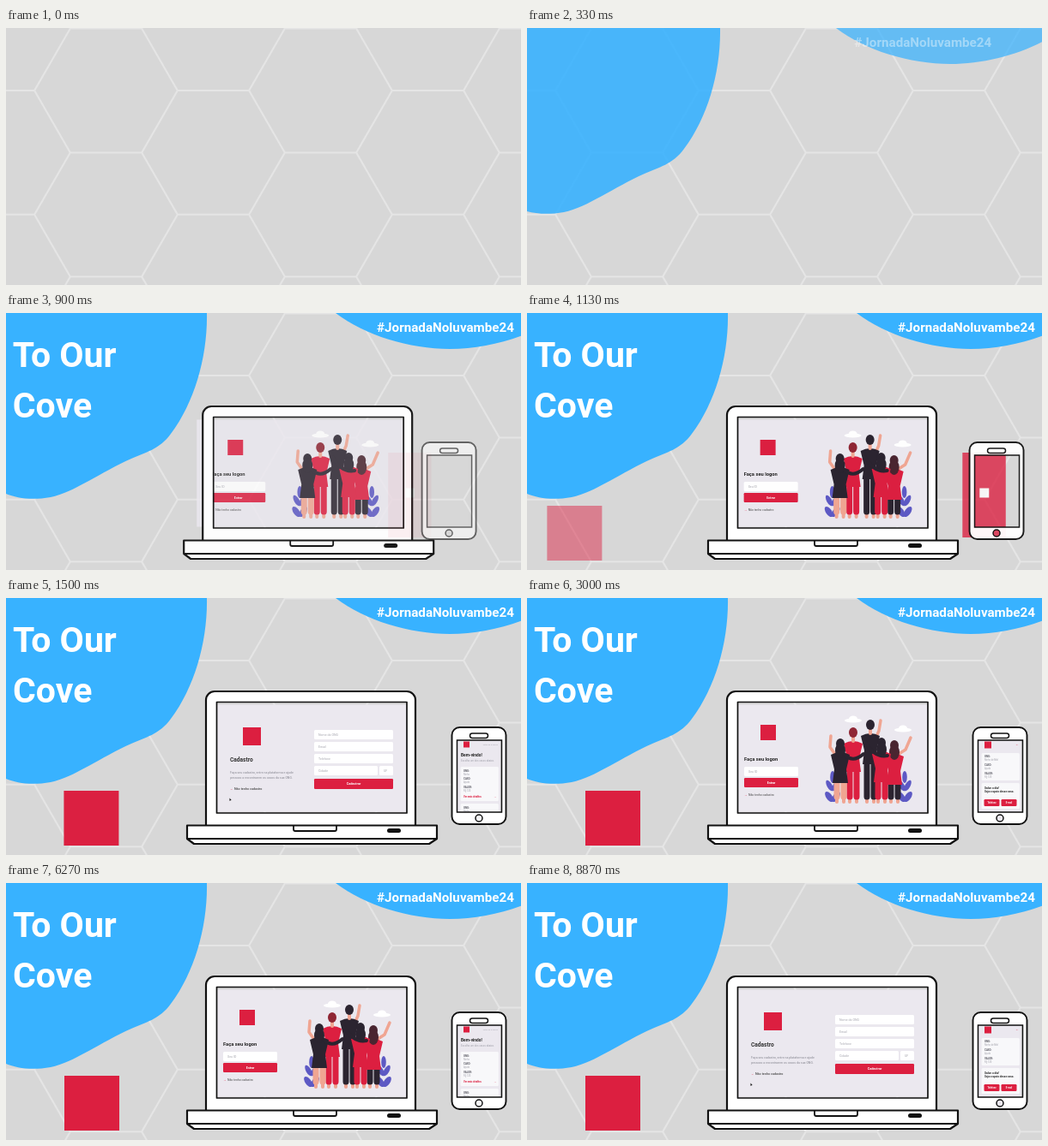
Write an HTML page with a canvas that moves like this. It is 600 by 300 pixels and loops after 9010 ms.

```html
<!DOCTYPE html>
<html lang="pt-BR">
<head>
<meta charset="utf-8">
<title>Apresentação</title>
<style>
html, body { margin: 0; width: 100%; height: 100%; overflow: hidden; background: #d7d7d7; }
canvas { display: block; }
</style>
</head>
<body>
<canvas id="stage" width="600" height="300"></canvas>
<script>
const W = 600, H = 300;
const LOOP = 9010, SLIDE = 600, DISTANCE = 85, PAGE = 1500;
const RED = '#dc1f40', BLUE = '#38b2ff', INK = '#111', DARK = '#2b2430';
const PAPER = '#ebe8ef', SKIN = '#f0a592', LEAF = '#5d59c4';
const stage = document.getElementById('stage').getContext('2d');
const buffer = document.createElement('canvas');
buffer.width = W;
buffer.height = H;
const g = buffer.getContext('2d');

function box(x, y, w, h, fill, r = 0) {
  g.fillStyle = fill;
  g.beginPath();
  g.roundRect(x, y, w, h, r);
  g.fill();
}

function text(str, x, y, size, fill, weight = 400, align = 'left') {
  g.font = `${weight} ${size}px Roboto, sans-serif`;
  g.textAlign = align;
  g.fillStyle = fill;
  g.fillText(str, x, y);
}

function shape(d, fill) {
  g.fillStyle = fill;
  g.fill(new Path2D(d));
}

function line(d, color, width) {
  g.strokeStyle = color;
  g.lineWidth = width;
  g.stroke(new Path2D(d));
}

function oval(x, y, rx, ry, fill, turn = 0) {
  g.fillStyle = fill;
  g.beginPath();
  g.ellipse(x, y, rx, ry, turn, 0, 7);
  g.fill();
}

function rounded(x, y, w, h, r) {
  const path = new Path2D();
  path.roundRect(x, y, w, h, r);
  return path;
}

// A white casing whose openings let the picture behind show through.
function casing(outer, openings, outerWidth, openingWidth) {
  const body = new Path2D(outer);
  body.addPath(openings);
  g.fillStyle = '#fff';
  g.fill(body, 'evenodd');
  g.strokeStyle = INK;
  g.lineWidth = outerWidth;
  g.stroke(outer);
  g.lineWidth = openingWidth;
  g.stroke(openings);
}

const backdrop = new Path2D();
for (let col = -1; col < 5; col++) {
  for (let row = -1; row < 3; row++) {
    const cx = 116.5 + col * 125;
    const cy = 73 + row * 144.8 + (col & 1) * 72.4;
    for (let k = 0; k < 6; k++) {
      const a = k * Math.PI / 3;
      backdrop[k ? 'lineTo' : 'moveTo'](cx + 83.4 * Math.cos(a), cy + 83.6 * Math.sin(a));
    }
    backdrop.closePath();
  }
}

function drawBackdrop() {
  stage.fillStyle = '#d7d7d7';
  stage.fillRect(0, 0, W, H);
  stage.strokeStyle = '#e5e5e5';
  stage.lineWidth = 2;
  stage.stroke(backdrop);
}

function leftBlob() {
  shape('M-120 0H234C235 50 220 104 192 141C179 159 162 163 146 170C110 186 80 209 52 215C30 219 12 216 0 211L-120 180Z', BLUE);
}

function topBlob() {
  shape('M384 0C418 26 470 42 517 42S616 26 650 0Z', BLUE);
}

function hashtag() {
  text('#JornadaNoluvambe24', 432, 22, 15.2, '#fff', 700);
}

function title() {
  text('To Our', 8, 63, 41, '#fff', 700);
  text('Cove', 8, 121.5, 41, '#fff', 700);
}

function emblem() {
  box(68, 225, 64, 64, RED);
}

function laptop() {
  g.lineJoin = 'round';
  casing(rounded(233, 109, 244, 157, [10, 10, 0, 0]), rounded(245.5, 121.5, 221.5, 129.5, 0), 2.2, 1.7);
  const base = 'M211 265.5H502V281L493 287H219L211 281Z';
  shape(base, '#fff');
  line(base + 'M211 281H502', INK, 2.2);
  line('M335 265.5V270Q335 272 337 272H383Q385 272 385 270V265.5', INK, 1.8);
  box(444, 269, 16, 5, INK, 2.5);
}

function phone() {
  const openings = rounded(525.5, 166, 52, 84, 0);
  openings.moveTo(555, 257);
  openings.arc(551, 257, 4, 0, 7);
  casing(rounded(519.5, 151, 63, 113, 9), openings, 1.9, 1.5);
  g.stroke(rounded(540.5, 158, 21, 5.5, 2.7));
}

function field(label, x, y, w) {
  box(x, y, w, 11, '#fff', 1.5);
  text(label, x + 5, y + 7, 3.6, '#a5a5ae');
}

function button(label, x, y, w, h, size) {
  box(x, y, w, h, RED, 1.2);
  text(label, x + w / 2, y + h / 2 + size * 0.36, size, '#fff', 700, 'center');
}

function plant(x, y) {
  for (const side of [-1, 1]) {
    oval(x + side * 4, y - 7, 3.5, 7, LEAF, side * 0.6);
    oval(x + side * 3.5, y - 20, 3, 7, LEAF, side * 0.5);
  }
  oval(x, y - 30, 2.8, 7, LEAF);
}

function person(x, head, top, legs, hair, longHair) {
  const hip = head + 42, foot = 238;
  g.lineCap = 'round';
  line(`M${x - 4} ${hip}V${foot}M${x + 4} ${hip}V${foot}`, SKIN, 4);
  line(`M${x - 4} ${hip}V${foot - 6}M${x + 4} ${hip}V${foot - 6}`, legs, 7);
  shape(`M${x - 11} ${head + 13}Q${x} ${head + 7} ${x + 11} ${head + 13}L${x + 7} ${hip - 12}L${x + 9} ${hip + 4}H${x - 9}L${x - 7} ${hip - 12}Z`, top);
  line(`M${x} ${head + 5}V${head + 10}`, SKIN, 4);
  oval(x, head, 5, 6, hair);
  if (longHair) oval(x, head + 8, 6, 9, hair);
}

function crowd() {
  g.lineJoin = 'round';
  for (const [x, y] of [[380, 143], [438, 154]]) {
    oval(x, y, 10, 2.5, '#fff');
    oval(x, y - 2, 5, 3.5, '#fff');
  }
  plant(356, 239);
  plant(440, 239);
  g.lineCap = 'round';
  line('M360 184L353 174L354 161', SKIN, 3.5);
  line('M406 164L410 155L412 143', SKIN, 3.5);
  line('M430 184L441 177L447 163', SKIN, 3.5);
  person(380, 157, RED, RED, '#8f2634');
  person(400, 148, DARK, DARK, DARK);
  person(428, 172, RED, DARK, '#4a2530', true);
  person(413, 169, RED, RED, DARK, true);
  person(365, 170, DARK, SKIN, DARK, true);
  line('M370 183Q380 193 392 182', DARK, 4);
  line('M394 168Q405 187 420 184', DARK, 4);
}

function logonPage() {
  box(272, 148, 18, 18, RED);
  text('Faça seu logon', 253, 189.5, 5.8, '#222', 700);
  field('Seu ID', 253, 197, 63);
  button('Entrar', 253, 210, 63, 11, 3.6);
  text('→', 253, 231, 3.6, RED, 700);
  text('Não tenho cadastro', 258, 231, 3.4, '#444');
  crowd();
}

function signupPage() {
  box(276, 151, 21, 21, RED);
  text('Cadastro', 261, 191, 6.6, '#333', 700);
  text('Faça seu cadastro, entre na plataforma e ajude', 261, 205, 3.55, '#85858f');
  text('pessoas a encontrarem os casos da sua ONG.', 261, 211, 3.55, '#85858f');
  text('←', 261, 224, 3.6, RED, 700);
  text('Não tenho cadastro', 266, 224, 3.7, '#444', 500);
  shape('M260.5 233.5V237L261.5 236.2L262.7 236Z', INK);
  ['Nome da ONG', 'Email', 'Telefone'].forEach((label, k) => field(label, 359, 154 + k * 14, 92));
  field('Cidade', 359, 196, 74);
  field('UF', 435, 196, 16);
  button('Cadastrar', 359, 211, 92, 12, 3.8);
}

function laptopScreen(page) {
  box(236, 124.5, 240, 125, PAPER);
  page % 2 ? signupPage() : logonPage();
}

function entry(label, value, x, y) {
  text(label, x, y, 2.9, '#5c5c66', 700);
  text(value, x, y + 4, 2.7, '#a0a0aa');
}

function splashView() {
  box(525.5, 163, 50.5, 99, RED);
  box(545.5, 204.5, 11, 11, '#fff');
}

function listView() {
  box(533, 167.5, 7, 7, RED);
  text('Total de 3 casos', 573, 172, 2.4, '#a0a0aa', 400, 'right');
  text('Bem-vindo!', 530, 185, 4.8, '#222', 700);
  text('Escolha um dos casos abaixo.', 530, 191, 2.9, '#a0a0aa');
  box(529.5, 197, 44.5, 40, '#f8f8fa', 1.5);
  entry('ONG:', 'Ninho', 533, 202.5);
  entry('CASO:', 'Ajuda', 533, 212);
  entry('VALOR:', 'R$ 120', 533, 221.5);
  text('Ver mais detalhes', 533, 232.5, 2.6, RED, 700);
  text('→', 571, 232.5, 3, RED, 700, 'right');
  box(529.5, 240, 44.5, 22, '#f8f8fa', 1.5);
  entry('ONG:', 'Ninho', 533, 245.5);
}

function detailView() {
  box(533, 167.5, 8, 8, RED);
  text('←', 573, 172, 4, RED, 700, 'right');
  box(529.5, 181, 44.5, 32, '#f8f8fa', 1.5);
  entry('ONG:', 'Ninho de Mel', 533, 186);
  entry('CASO:', 'Ajuda', 533, 196);
  entry('VALOR:', 'R$ 120', 533, 206);
  box(529.5, 216, 44.5, 30, '#f8f8fa', 1.5);
  text('Salve o dia!', 533, 222.5, 3.3, '#222', 700);
  text('Seja o apoio desse caso.', 533, 227, 3.1, '#222', 700);
  button('Telefone', 532.5, 235, 18, 8, 2.6);
  button('E-mail', 552.5, 235, 18, 8, 2.6);
}

function phoneScreen(page) {
  box(525.5, 163, 50.5, 99, PAPER);
  [splashView, listView, detailView][page % 3]();
}

// Listed back to front, each with the time its entrance begins.
const layers = [
  [leftBlob, 15], [topBlob, 125], [hashtag, 236], [title, 393],
  [laptopScreen, 628], [laptop, 514], [phoneScreen, 890], [phone, 747], [emblem, 1015]
];

function drawLayer(draw, start, time, page) {
  const p = Math.min(1, (time - start) / SLIDE);
  if (p <= 0) return;
  const rest = (1 - p) ** 3;
  g.clearRect(0, 0, W, H);
  g.save();
  g.translate(-DISTANCE * rest, 0);
  draw(page);
  g.restore();
  stage.globalAlpha = 1 - rest;
  stage.drawImage(buffer, 0, 0);
  stage.globalAlpha = 1;
}

function render() {
  const time = performance.now() % LOOP;
  const page = Math.min(5, Math.floor(time / PAGE));
  drawBackdrop();
  for (const [draw, start] of layers) drawLayer(draw, start, time, page);
  requestAnimationFrame(render);
}

render();
</script>
</body>
</html>
```
